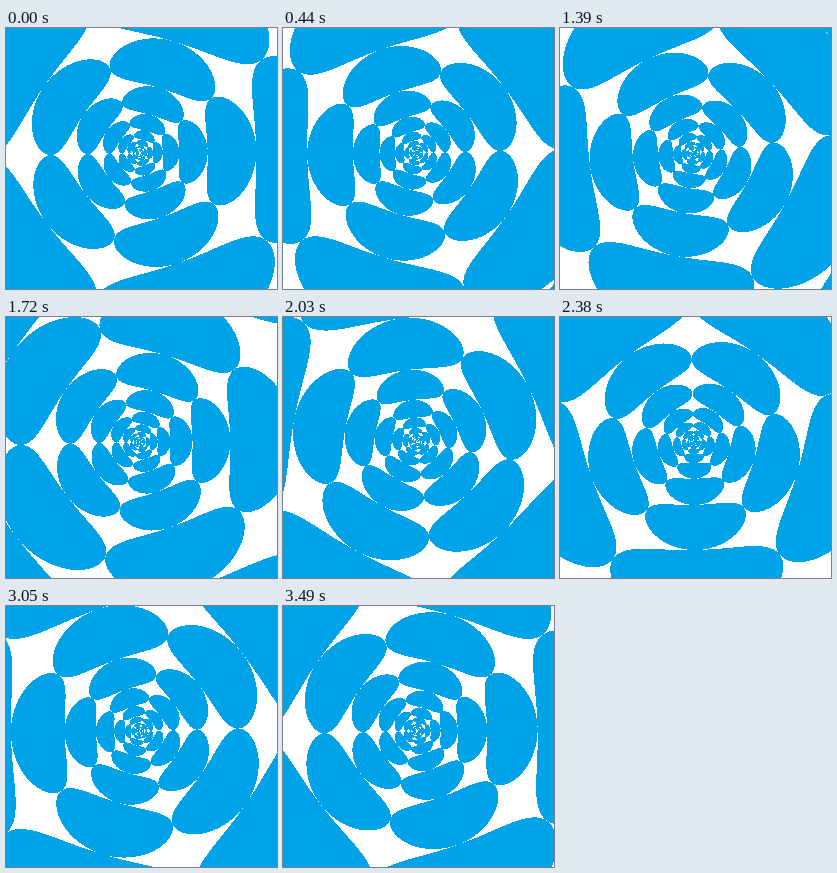
Write an HTML page that moves like this. It is 271 by 261 pixels and loops after 3590 ms.

```html
<!DOCTYPE html>
<html>
<head>
<meta charset="utf-8">
<style>
html, body { margin: 0; width: 100%; height: 100%; overflow: hidden; background: #fff; }
svg { display: block; width: 100vw; height: 100vh; }
</style>
</head>
<body>
<svg viewBox="0 0 271 261" shape-rendering="crispEdges">
  <g id="rings" fill="#00a2e8"></g>
</svg>
<script>
const LOOP = 3590;
const TICK = 72.5;             // ms between poses
const LAST = 48;               // the final pose is held until the loop restarts
const GAP = 0.54;              // log of the size ratio between rings
const SECTOR = Math.PI * 2 / 5;
const rings = document.getElementById('rings');

// A bean is an ellipse in (log radius, angle) space.
function bean(mid) {
  const pts = [];
  for (let i = 0; i < 96; i++) {
    const t = i / 96 * Math.PI * 2;
    const r = Math.exp(GAP / 2 * Math.sin(t));
    const a = mid + SECTOR / 2 * Math.cos(t);
    pts.push((r * Math.cos(a)).toFixed(4) + ' ' + (r * Math.sin(a)).toFixed(4));
  }
  return 'M' + pts.join('L') + 'Z';
}

let ringPath = '';
for (let i = 0; i < 5; i++) ringPath += bean(i * SECTOR);

for (let k = -1; k < 13; k++) {
  const path = document.createElementNS('http://www.w3.org/2000/svg', 'path');
  path.setAttribute('d', ringPath);
  path.setAttribute('transform', `scale(${Math.exp(k * GAP)})`);
  rings.appendChild(path);
}

// Each pose turns the rings by 6 degrees and grows them by a fixed ratio.
function draw(ms) {
  const pose = Math.min(LAST, Math.floor(ms / TICK + 0.3));
  const size = Math.exp((4.489 + 0.0795 * pose) % GAP);
  const turn = 73.4 + 6 * pose;
  rings.setAttribute('transform', `translate(133.7 125) rotate(${-turn}) scale(${size})`);
}

const start = performance.now();
function tick() {
  draw((performance.now() - start) % LOOP);
  requestAnimationFrame(tick);
}
tick();
</script>
</body>
</html>
```
